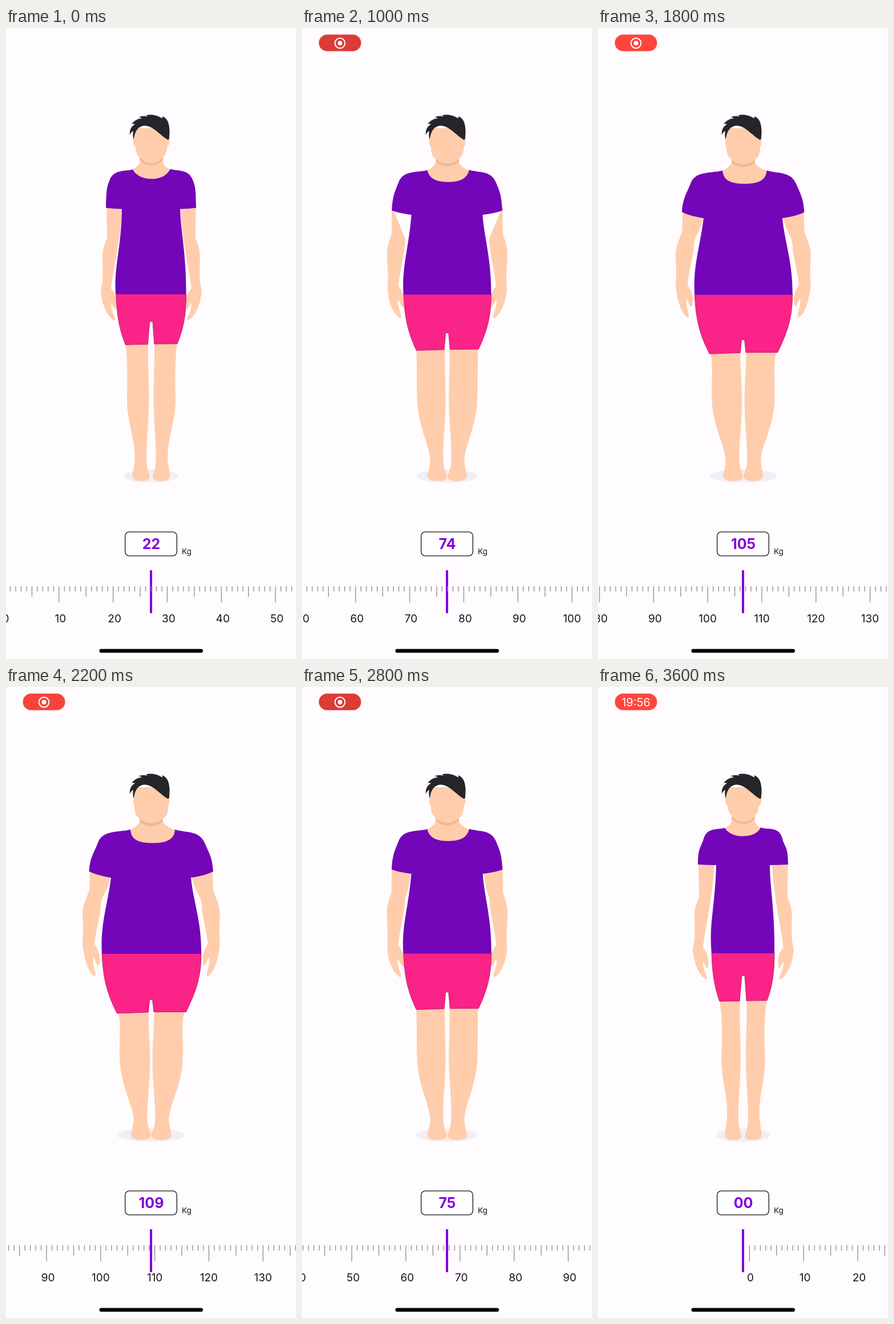
Animation, 508 px wide and 1102 px high, one loop 3700 ms. Source, as an HTML page:

```html
<!DOCTYPE html>
<html lang="en">
<head>
<meta charset="utf-8">
<title>Weight picker</title>
<style>
  html, body { margin: 0; width: 100%; height: 100%; overflow: hidden; background: #fefcff; }
  svg { display: block; width: 100%; height: 100%; }
  text { font-family: Inter, sans-serif; fill: #16151a; text-anchor: middle; }
  .skin { fill: #ffcdab; }
</style>
</head>
<body>
<svg viewBox="0 0 508 1102">
  <g id="pill">
    <rect id="pillBg" x="29.5" y="11.5" width="74" height="29" rx="14.5"/>
    <g id="rec" fill="#fff">
      <circle cx="66.5" cy="26.5" r="8.8" fill="none" stroke="#fff" stroke-width="2"/>
      <circle cx="66.5" cy="26.5" r="4"/>
    </g>
    <text id="clock" x="66.5" y="33.5" font-size="20" style="fill:#fff">19:56</text>
  </g>

  <ellipse id="shadow" cx="254" cy="782.5" ry="11.5" fill="#f1eff4"/>
  <g class="skin">
    <path class="leg"/>
    <path class="leg" transform="matrix(-1 0 0 1 508.8 0)"/>
    <path class="arm"/>
    <path class="arm" transform="matrix(-1 0 0 1 508.8 0)"/>
    <path class="neck"/>
  </g>
  <path class="chin" fill="#e9bb9b"/>
  <path class="face skin"/>
  <path fill="#252428" d="M224 195C222 190 222 185 223 180C219 182 218 184 217 187C216 179 219 172 226 168C223 167 222 167 220 168C225 161 232 158 238 158C236 156 234 156 232 156C238 153 244 154 248 155C247 154 246 153 244 153C252 150 264 151 274 158C274 156 274 155 273 154C283 157 289 168 285.500 195H283C268 186 258 171 243 170.500C232 171 225 180 224 195Z"/>
  <path class="shorts" fill="#fa2387" stroke="#b4146c" stroke-width=".8"/>
  <path class="shirt" fill="#7206b8"/>

  <rect x="208.700" y="880.200" width="90.600" height="41.600" rx="7" fill="#fff" stroke="#16151a" stroke-width="1.300"/>
  <text id="value" x="254.500" y="909.700" font-size="25" font-weight="700" style="fill:#8200dc"></text>
  <text x="316.500" y="919" font-size="13.500">Kg</text>

  <rect x="252" y="947" width="4" height="75" fill="#8200dc"/>
  <g id="ruler">
    <path id="ticks" stroke="#8d8b92" stroke-width="1.300"/>
  </g>
  <rect x="163.500" y="1084.500" width="181.500" height="6.500" rx="3.250"/>
</svg>
<script>
const LOOP = 3700, STEP = 100, LAG = 80, UNIT = 9.48;
const $ = id => document.getElementById(id);
const NUM = /-?[\d.]+/g;

// Blend every number in two equally built strings.
function mix(a, b, k) {
  const ends = b.match(NUM);
  let i = 0;
  return a.replace(NUM, v => (+v + (ends[i++] - v) * k).toFixed(2));
}

// Value at x between [position, number or path] stops.
function at(stops, x) {
  let i = 0;
  while (i < stops.length - 2 && x > stops[i + 1][0]) i++;
  const [x0, a] = stops[i], [x1, b] = stops[i + 1];
  const k = Math.min(1, Math.max(0, (x - x0) / (x1 - x0)));
  return mix(String(a), String(b), k);
}

// Ruler position over time
const scroll = [
  [-80, 22], [0, 27], [420, 53], [500, 55], [920, 74], [1000, 76.9],
  [1320, 95], [1400, 96.6], [1900, 109], [2200, 109.3], [2400, 104],
  [2720, 75], [2800, 67.6], [3500, 0], [3600, -1.2]
];

// Body outlines by weight
const body = {
  shirt: [
    [0, "M222 246C229 257 242 260.5 253 260.5C267 260.5 279 257 285 245.5C300 250 317 243 323 265C327 280 333 278 333 310Q316 311 301 311C301 350 310 390 309 465H199C194 415 205 385 207 311Q191 311 175 310C175 280 181 279 185 265C191 245 208 250 222 246Z"],
    [22, "M222 247C228 259 242 263.5 255 263.5C269 263.5 281 259 288 246C300 251 319 245 327 265C333 280 332 285 333 314Q320 316 305 316C306 355 316 395 315.5 465H192C189 415 202 385 203 316Q188 316 175 314C176 284 176 279 181 267C188 246 208 251 222 247Z"],
    [109, "M218 249C219 266 231 272.5 257 272.5C282 272.5 295 266 296 249C315 255 338 250 348 272C356 291 361 296 363 322Q351 329 324 333C328 375 343 410 342 466H168C165 415 177 385 184 333Q159 329 145.5 322C147 297 155 288 161 272C169 249 199 254 218 249Z"]
  ],
  shorts: [
    [0, "M199 464H309C309 500 305 525 296 547.5L260 548L257 504H252L248 548.5L213 549C203 522 200 495 199 464Z"],
    [109, "M168 465H342C342 510 331 535 315.5 567.5L259 567.5L256.5 546H251.5L249.5 568L194.5 570C175 532 170 505 168 465Z"]
  ],
  arm: [
    [22, "M176 306L177 366C170 384 169 390 169 404C170 430 170 440 166 458C167 480 177 506 191 511C193 506 183 494 184 480C188 481 186 490 193 491C194 470 192 464 184 455C187 425 201 370 204 306Z"],
    [74, "M157.5 312L157 360C150 378 149 386 149 400C151 430 151 438 150 454C150 475 160 502 173 507C177 503 167 490 168 475C172 476 171 487 179 488C179 470 178 461 169 451C172 420 181 390 181 368C186 358 189 340 191 318Z"],
    [109, "M147 316L146 355C136 380 134 385 134 400C136 430 135 434 134 447C136 470 143 500 156 505.5C160 500 151 488 153 473C157 474 156 486 163 486C166 470 163 460 155 449C158 420 166 400 166 380C168 360 180 358 184 326Z"]
  ],
  leg: [
    [0, "M212 540C218 575 218 610 216 650C217 690 226 710 226 740C227 765 222 770 222 784C225 791 231 791 238 791C246 791 251 790 251 783C250 776 246 770 246 755C245 720 250 690 250 645C250 610 247 580 249 530Z"],
    [74, "M200 550C202 590 200 620 202 655C205 697 221 725 224 750C226 765 220 772 220 785C224 791 231 791 238 791C248 791 254 789 253.5 781C251 774 248 768 247.5 755C246 720 252 690 251.5 645C251.5 610 249 580 251 540Z"],
    [109, "M194 560C203 580 198 615 199 650C201 695 220 725 223 750C225 765 219 772 219.5 785C224 791 231 791 238 791C248 791 254.5 789 254 780C251 774 248 768 247.5 755C247 720 253 690 252 645C252 610 248 590 250 555Z"]
  ],
  neck: [
    [0, "M234 215V235Q231 242 222 247V252L240 266H270L285 251V246Q277 242 275 235V215Z"],
    [109, "M234 215V235Q231 243 217 250V272L240 276H274L297 272V250Q279 244 275 235V215Z"]
  ],
  chin: [
    [0, "M234 219V229Q242 239.5 254.5 239.5Q267 239.5 275 229V219Z"],
    [109, "M234 225V235Q243 243 254.5 243Q266 243 275 235V225Z"]
  ],
  face: [
    [0, "M225 175V193C221 195 223 206 227 207C228 216 230 222 236 227C243 233.5 248 235.5 254.5 235.5C261 235.5 266 233.5 273 227C279 222 281 216 282 207C286 206 288 195 284 193V175Z"],
    [109, "M225 175V194C222 196 222 206 225 207C225 220 227 225 234 230C242 236.5 248 237.5 254.5 237.5C261 237.5 267 236.5 275 230C282 225 284 220 284 207C287 206 287 196 284 194V175Z"]
  ]
};
const shadowWidth = [[0, 47], [53, 49], [109, 60]];

let d = "";
for (let n = 0; n <= 150; n++) {
  const x = (n * UNIT).toFixed(2);
  d += `M${x} 975V${n % 10 ? n % 5 ? 984 : 993 : 1003}`;
  if (n % 10) continue;
  const label = document.createElementNS("http://www.w3.org/2000/svg", "text");
  label.textContent = n;
  label.setAttribute("x", +x + [1.5, 2.5, 0][label.textContent.length - 1]);
  label.setAttribute("y", 1037.5);
  label.setAttribute("font-size", 19);
  $("ruler").append(label);
}
$("ticks").setAttribute("d", d);

function draw(t) {
  const weight = Math.max(0, at(scroll, t - LAG));
  for (const part in body) {
    const shape = at(body[part], weight);
    document.querySelectorAll("." + part).forEach(p => p.setAttribute("d", shape));
  }
  $("shadow").setAttribute("rx", at(shadowWidth, weight));
  $("value").textContent = String(Math.round(weight)).padStart(2, "0");
  $("ruler").setAttribute("transform", `translate(${254 - at(scroll, t) * UNIT} 0)`);

  const glow = 0.5 + 0.5 * Math.cos((t - 100) / 1800 * 2 * Math.PI);
  $("pillBg").setAttribute("fill", mix("rgb(220,59,54)", "rgb(255,69,60)", glow));
  $("pill").setAttribute("opacity", Math.min(1, Math.max(0, t / 200)));
  const timed = t >= 3200;
  $("rec").setAttribute("visibility", timed ? "hidden" : "visible");
  $("clock").setAttribute("visibility", timed ? "visible" : "hidden");
}

// The picture advances ten times a second.
const start = performance.now();
function tick() {
  const t = (performance.now() - start) % LOOP;
  draw(Math.floor(t / STEP) * STEP);
  requestAnimationFrame(tick);
}
tick();
</script>
</body>
</html>
```
